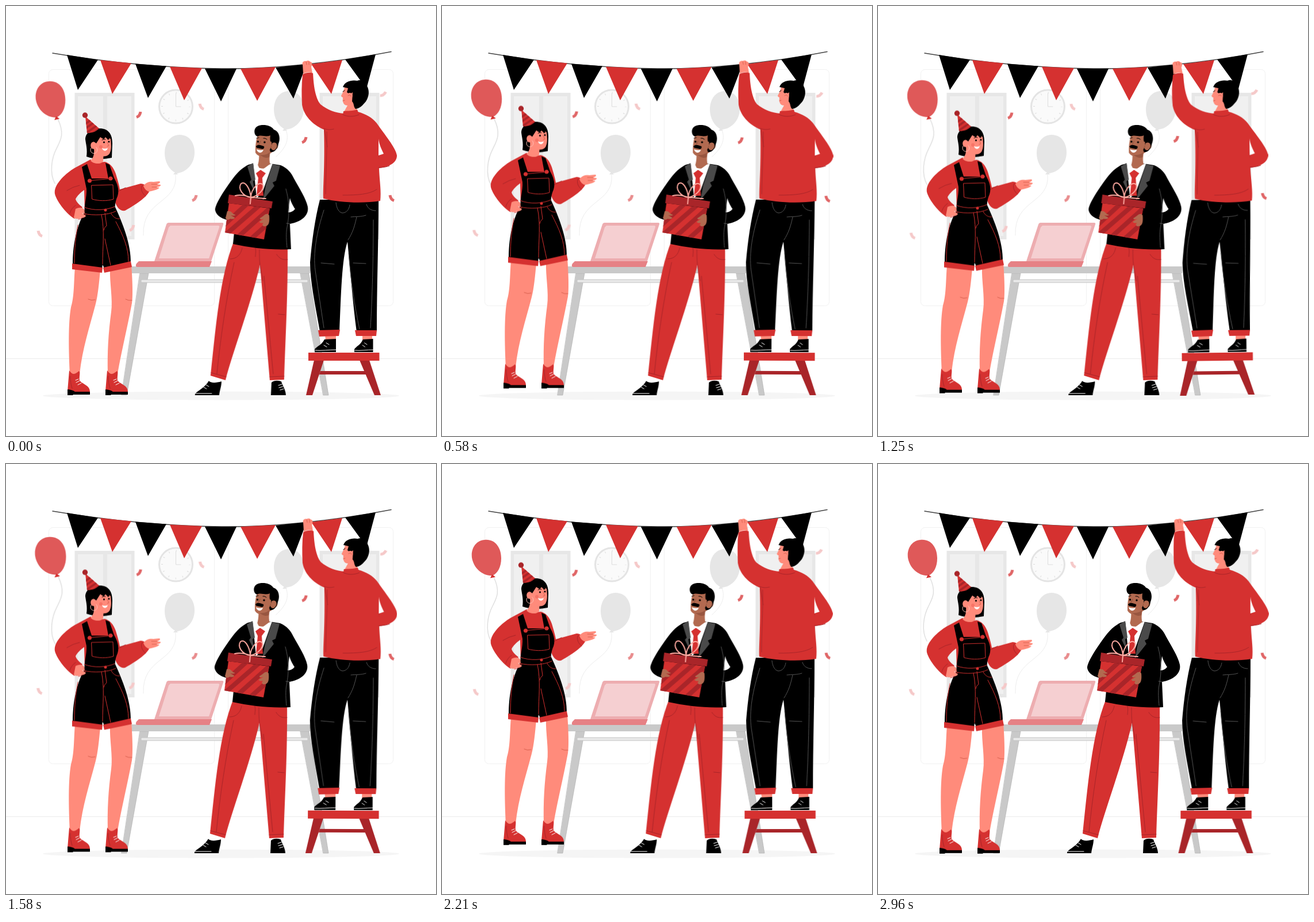
Write an HTML page that moves like this. It is 748 by 748 pixels and loops after 3 s.

```html
<!DOCTYPE html>
<html lang="en">
<head>
<meta charset="utf-8">
<title>Party preparations</title>
<style>
html, body { margin: 0; width: 100%; height: 100%; overflow: hidden; background: #fff; }
svg { display: block; width: 100%; height: 100%; }

.r { fill: #d53130; } .d { fill: #a92529; } .k { fill: #000; }
.s { fill: #ff8b7b; } .b { fill: #b26a50; } .w { fill: #fff; }
.g { fill: #c9c9c9; } .e { fill: #e6e6e6; } .p { fill: #f0f0f0; }
.l { fill: none; stroke-width: 1; stroke-linecap: round; stroke-linejoin: round; }
.lr { stroke: #d53130; } .ld { stroke: #a92529; } .lk { stroke: #000; }
.lg { stroke: #555; } .lw { stroke: #fff; } .le { stroke: #e6e6e6; }
.ls { stroke: #d9604f; }

/* every part runs 40 ms ahead of the clock */
#woman, #host, #climber, #confetti, #balloon { animation: 1.5s linear -40ms infinite; }
#woman { animation-name: float; }
#host { animation-name: shake; animation-duration: 3s; }
#climber { animation-name: sway; transform-origin: 598px 386px; }
#confetti { animation-name: sway; transform-origin: 364px 276px; }
#balloon { animation-name: beat; animation-duration: 3s; transform-origin: 77px 220px; }

@keyframes float {
  0%, 100% { transform: translateY(.8px); }
  50% { transform: translateY(-14.2px); }
}
@keyframes sway {
  0%, 100% { transform: rotate(-.1deg); }
  25% { transform: rotate(.9deg); }
  75% { transform: rotate(-1.1deg); }
}
@keyframes shake {
  0%, 100% { transform: translateX(0); }
  10%, 90% { transform: translateX(-1.5px); }
  20%, 80% { transform: translateX(3px); }
  30%, 50%, 70% { transform: translateX(-6px); }
  40%, 60% { transform: translateX(6px); }
}
@keyframes beat {
  0%, 28%, 40%, 62%, 100% { transform: scale(1); }
  13%, 49% { transform: scale(1.09); }
}
</style>
</head>
<body>
<svg viewBox="0 0 748 748">
  <defs>
    <g id="window">
      <path class="e" fill-opacity=".95" d="M119.500 151H223.500V406H119.500Z"/>
      <path class="p" d="M125 157H169V400H125ZM176 157H218V400H176Z"/>
    </g>
    <path id="bit" class="l" d="M-4 4.500Q2 2.500 3 -5" style="stroke-width:5;stroke-linecap:butt"/>
    <g id="grey">
      <path class="e" d="M302 224C319 224 328 238 328 255C328 274 314 290 296 291C283 285 276 270 276 256C276 238 286 224 302 224Z"/>
      <path class="e" d="M295 288L291 293H299Z"/>
    </g>
    <g id="boot">
      <path class="r" d="M110 634C113 638 115 640 118 640C121 640 124 637 127 635C130 637 127 645 128 651C132 658 146 659 146 671L145 674H118L107 670Z"/>
      <path class="k" d="M107 667C111 667 116 668 120 671L146 671V676H117L116 677H107Z"/>
      <path class="l lw" d="M121 651L126 649M122 655L128 652M125 659L131 656"/>
      <path class="l ld" d="M112 644C112 652 113 660 115 665"/>
    </g>
    <g id="sneaker">
      <path class="k" d="M554 580L574 579V602H537V597C542 591 549 590 554 580Z"/>
      <path class="l lw" d="M538 599C548 600 562 598 574 598M553 590L558 593M557 586L562 589"/>
    </g>
    <clipPath id="cone"><path d="M138 192L162 213C156 219 149 221 141 221Z"/></clipPath>
    <clipPath id="box"><path d="M388 343L459 352L449 406L381 394Z"/></clipPath>
  </defs>

  <!-- room -->
  <g class="l" stroke="#f1f1f1">
    <rect x="74.500" y="110.500" width="288" height="411" rx="7"/>
    <rect x="386.500" y="110.500" width="287" height="411" rx="7"/>
    <path d="M0 613.500H748" stroke="#ebebeb"/>
  </g>
  <ellipse cx="374" cy="678" rx="310" ry="7.500" fill="#f5f5f5"/>
  <use href="#window"/><use href="#window" x="426"/>
  <circle cx="295.500" cy="175" r="29" fill="#fafafa" stroke="#e4e4e4" stroke-width="3"/>
  <circle class="l" cx="295.500" cy="175" r="24" stroke="#ddd" style="stroke-width:3;stroke-linecap:butt" stroke-dasharray="1 11.566" stroke-dashoffset=".5"/>
  <path class="l" stroke="#ddd" d="M295.500 152V175H304"/>
  <use href="#grey"/><use href="#grey" x="190" y="-76"/>
  <path class="l" stroke="#ededed" d="M295 293C300 345 236 335 239 399M487 216C494 234 485 248 470 262"/>

  <g id="balloon">
    <path class="l" stroke="#dfdfdf" style="stroke-width:1.500" d="M90 197C102 222 95 233 88 247C79 264 75 290 85 308"/>
    <path fill="#df5959" d="M74 132C92 130 103 145 103 164C103 179 97 190 88 194C70 195 55 181 52 163C50 147 59 133 74 132Z"/>
    <path class="r" d="M87 192L84 198.500L93 196.500Z"/>
  </g>

  <!-- table and laptop -->
  <path class="l" stroke="#aaa" fill="#c9c9c9" style="fill:#c9c9c9;stroke-width:.6" d="M233 465H248L210 677H201ZM512 465H527L561 677H552Z"/>
  <path stroke="#c2c2c2" fill="#e9e9e9" d="M235 476H525V481H235Z"/>
  <path class="g" d="M214 453H529V465H214Z"/>
  <path fill="#edadb0" d="M283 377H376Q379 377 378 380L357 444H258L279 380Q280 377 283 377Z"/>
  <path fill="#f5cfd1" d="M286 382H369Q372 382 371 385L353 439H266L283 385Z"/>
  <path fill="#e68185" d="M231 444H358L354 454H228Q224 453 227 448Z"/>

  <g id="confetti">
    <g stroke="#e06667">
      <use href="#bit" x="231" y="189"/><use href="#bit" x="519" y="233"/>
      <use href="#bit" transform="translate(671 334)scale(-1 1)"/>
    </g>
    <use href="#bit" x="328" y="334" stroke="#e98d8e"/>
    <g stroke="#f5c9c9">
      <use href="#bit" x="219" y="386"/><use href="#bit" transform="translate(656 153)rotate(20)"/>
      <use href="#bit" transform="translate(340 175)scale(-1 1)"/>
      <use href="#bit" transform="translate(59 396)scale(-1 1)"/>
    </g>
  </g>

  <!-- bunting -->
  <path class="l" stroke="#444" style="stroke-width:1.500" d="M81 82C200 102 300 108 375 109S560 101 670 79.500"/>
  <path class="k" d="M106 85L160 93.500L125 146ZM225 100.500L279 104.500L247 160ZM346 109H401L374 166ZM469 107L523 101L500 161ZM590 93L643 84L627 144Z"/>
  <path class="r" d="M164 94L218 99.500L185 153ZM285 105.500L341 108L310 164ZM408 109L469 106L437 165ZM531 101L585 94L566 153Z"/>

  <g id="host">
    <!-- shoes, trousers -->
    <path class="k" d="M353 652C356 656 365 656 375 653C375 662 372 668 371 677H329C328 671 344 667 353 652ZM462 655C466 651 473 651 479 653C481 660 487 668 487 677H461Z"/>
    <path class="l lw" d="M344 663L349 666M348 659L353 662M330 674H358M474 660L480 658M475 664L482 662M477 668L483 666"/>
    <path class="r" d="M397 408L490 415C491 500 486 580 484 650L459 651L442 450C426 520 395 600 382 651L356 643C365 560 372 470 397 408Z"/>
    <path class="l ld" d="M357 638L383 645M459 645L484 644M441 424C441 432 441 442 442 450L447 478M433 418C436 425 434 432 434 436M390 440C402 440 409 432 411 421M397 446C383 510 373 580 367 640M449 470L465 640M474 536L485 537M471 432C476 440 482 442 490 441"/>
    <!-- jacket and shirt -->
    <path class="k" d="M422 276L434 273L460 274L478 277C490 282 497 291 501 300C511 318 522 335 525 349C528 365 512 376 494 379L496 423C462 425 428 421 395 414L399 375C390 373 367 371 364 355C363 345 384 314 398 296C406 286 414 280 422 276Z"/>
    <path class="w" d="M494 334C496 342 501 350 503 353C500 357 496 359 491 359Z"/>
    <path class="w" d="M430 273L439 271L456 275L464 274L446 325L436 334Z"/>
    <path class="b" d="M440 254L461 250C458 262 458 270 460 276C455 283 446 285 437 280C440 273 441 263 440 254Z"/>
    <path class="w" d="M430 273L438 276L443 287L436 298ZM463 274L458 276L443 287L451 299Z"/>
    <path class="r" d="M443 285L452 291L446 299L448 330H436L439 299L435 291Z"/>
    <path fill="#4a4a4a" d="M420 279L430 273L434 302L430 305L433 325L424 306L427 302ZM464 275L477 278L470 304L464 307L467 313L447 338L452 312Z"/>
    <path class="l lg" d="M487 318C493 340 494 360 489 385C487 395 488 410 489 420M494 379L488 378"/>
    <!-- head -->
    <path class="b" d="M438 225C434 236 434 247 434 255C438 262 447 264 456 259C464 254 466 252 467 250C476 249 475 238 468 237L465 222Z"/>
    <path d="M441 258C447 261 456 258 459 254L458 263C452 266 446 262 441 258Z" fill="#985640"/>
    <path class="k" d="M438 227C431 225 430 213 438 209C446 205 461 207 466 215C476 218 478 230 474 240C473 246 468 256 460 254L459 250C461 246 463 243 462 236C460 237 459 234 460 225C452 229 444 223 438 227Z"/>
    <path class="b" d="M463 239C470 234 475 243 469 249C466 253 461 250 461 246Z"/>
    <path class="k" d="M435 244C439 240 443 242 449 244C450 248 447 250 443 248C439 247 436 248 435 244Z"/>
    <path class="w" d="M436 249C440 251 444 251 448 250C446 257 438 257 436 249Z"/>
    <circle class="k" cx="438.500" cy="236" r="1.700"/><circle class="k" cx="450" cy="237" r="1.700"/>
    <path class="l lk" d="M436 230L440 229M448 230Q451 229 454 232"/>
    <path class="l" stroke="#8b4d3a" d="M443 235L440 241"/>
    <!-- gift -->
    <path class="r" d="M388 343L459 352L449 406L381 394Z"/>
    <path class="l ld" clip-path="url(#box)" style="stroke-width:8" d="M374 386L425 339M383 397L443 345M399 406L458 353M421 410L466 370"/>
    <path class="d" d="M388 328L464 340L462 352L386 343Z"/>
    <g class="l" stroke="#ffaaa1" style="stroke-width:2">
      <path d="M426 333C412 331 403 318 409 309C416 303 425 318 426 333ZM426 333C427 318 440 303 447 311C450 320 438 331 426 333ZM426 333L425 344M399 330C410 327 420 331 426 333C437 333 445 335 452 335"/>
    </g>
    <path class="b" d="M385 357C393 355 393 362 399 363C400 365 395 365 391 364L398 368C398 371 393 371 390 370C388 372 384 373 382 369ZM458 364C452 358 449 366 442 369C441 372 447 371 449 370L441 375C441 378 446 378 448 377C444 382 448 384 452 383C458 382 459 374 458 364Z"/>
  </g>

  <g id="woman">
    <!-- legs, boots -->
    <path class="s" d="M120 455L164 460C162 480 160 503 156 518C145 560 133 595 128 640C123 646 115 645 111 640C109 600 108 552 113 524C119 506 118 476 120 455ZM181 458L218 450C220 475 221 506 219 517C211 560 202 595 194 640C190 646 181 645 177 640C176 602 178 570 183 532C186 510 180 480 181 458Z"/>
    <path class="l ls" d="M143 510Q149 513 155 511M208 510Q213 513 219 512"/>
    <use href="#boot"/><use href="#boot" x="66"/>
    <!-- shorts -->
    <path class="k" d="M137 358L190 350C202 376 218 414 217 448L171 456L168 450L167 457L116 450C116 420 121 386 137 358Z"/>
    <path class="r" d="M115 448L168 455L167 464L115 458ZM169 455L217 444L219 454L171 464Z"/>
    <path class="l lr" d="M166 363C172 390 168 420 168 449M172 360L175 382Q170 386 170 390M126 371C134 370 138 364 140 359M183 361C187 369 194 371 198 370M125 381C121 402 119 422 119 447M172 405L182 451M191 375C204 400 213 420 213 444"/>
    <!-- sweater -->
    <path class="r" d="M147 267C154 273 165 272 172 271C180 273 187 280 191 292C194 302 197 312 198 319L234 309C242 309 249 316 249 323C243 335 218 350 207 356C199 357 194 352 190 342L188 354L137 361L136 320C130 324 123 331 121 336C123 342 128 346 133 350L119 370C107 363 89 342 85 327C82 311 104 291 119 282Z"/>
    <path class="l ld" d="M121 347C116 350 112 356 111 361M237 312C233 318 237 326 243 331M106 321Q117 314 128 312M192 324L208 316"/>
    <path class="s" d="M121 353C127 350 132 350 135 353L141 359C142 362 136 361 132 360L139 365C138 368 133 369 131 368C126 371 121 371 118 368ZM239 313C244 306 251 305 256 306L266 305C270 305 268 309 262 310L269 311C270 314 263 315 261 315L267 316C264 320 255 321 249 323Q242 321 239 313Z"/>
    <path class="l ls" d="M253 310L263 310M254 315L262 315"/>
    <!-- overalls -->
    <path class="k" d="M132 280L141 275L149 300H178L173 273L180 276L188 299C193 308 198 319 194 331C190 340 189 348 190 358L137 362C135 348 141 332 140 318Z"/>
    <path class="l lr" d="M149 312L186 311L187 336C175 340 160 339 150 336ZM136 350C153 357 176 355 189 349M135 361C152 365 177 364 191 357M142 304L186 300"/>
    <path class="r" d="M142 304a3.500 3.500 0 1 0 7 0a3.500 3.500 0 1 0 -7 0M178.500 300a3.500 3.500 0 1 0 7 0a3.500 3.500 0 1 0 -7 0M170.500 355a2.500 2.500 0 1 0 5 0a2.500 2.500 0 1 0 -5 0"/>
    <!-- head -->
    <path class="k" d="M138 232C138 220 150 213 163 213C178 213 185 223 185 239L184 264C170 267 153 267 140 262C142 250 139 240 138 232Z"/>
    <path class="s" d="M153 247L170 255L169 270C164 277 151 274 147 269C152 264 154 258 153 247Z"/>
    <path class="s" d="M157 229C163 228 175 227 182 231C183 241 184 250 180 257C175 264 162 262 157 256C155 249 154 235 157 229Z"/>
    <path class="s" d="M157 238C151 233 145 239 148 246C150 250 155 249 157 247Z"/>
    <path class="k" d="M153 236C152 222 163 216 172 218C180 219 184 225 184 234L180 228L178 233L173 228L170 232L164 228L157 239Z"/>
    <path class="l" stroke="#ffc2b8" d="M148 247A6 6 0 1 0 157 246"/>
    <circle class="k" cx="170.500" cy="237" r="1.600"/><circle class="k" cx="179" cy="236" r="1.600"/>
    <path class="l lk" d="M167 233Q170 231 173 232M177 232L180 231"/>
    <path class="l ls" d="M176 237L179 243L176 244"/>
    <path class="w" d="M167 247C171 249 175 248 177 247C176 253 169 254 167 247Z"/>
    <circle cx="165" cy="245" r="3" fill="#f77467"/>
    <!-- hat -->
    <g clip-path="url(#cone)">
      <path class="r" d="M130 188H168V225H130Z"/>
      <path class="l ld" style="stroke-width:3.500" d="M134 208L152 195M134 216L158 199M138 222L164 204M148 224L166 211"/>
    </g>
    <circle class="d" cx="137.500" cy="190" r="4.700"/>
  </g>

  <g id="climber">
    <!-- stool -->
    <path class="d" d="M536 616H553L533 677H522ZM615 616H632L652 677H641ZM547 635H626V641H545Z"/>
    <path class="r" d="M526 603H649.500V617H526Z"/>
    <!-- feet, trousers -->
    <path class="s" d="M555 571H574V583H556ZM620 571H637V583H620Z"/>
    <use href="#sneaker"/><use href="#sneaker" x="606" transform="translate(606 0)scale(.88 1)translate(-1143 0)"/>
    <path class="k" d="M546 337H648C648 410 645 490 645 566L610 567C603 515 599 460 594 410C584 440 583 500 580 566H546C538 520 529 480 529 446C532 410 537 372 546 337Z"/>
    <path class="r" d="M543 564L581 563L579 574L545 575ZM607 564H645L644 574H609Z"/>
    <path class="l lg" d="M574 342C575 352 579 359 585 360C593 360 597 353 598 346M627 345C629 352 635 356 643 356M626 364C617 367 609 366 600 367M610 367C606 385 603 394 595 407M553 355C540 395 534 430 538 460L553 560M548 447L571 449M604 447L626 448M596 430C600 480 606 520 615 562M639 372C639 440 637 510 634 560"/>
    <!-- sweater -->
    <path class="d" d="M646 259L656 258L655 281L646 282Z"/>
    <path class="r" d="M516 119C522 115 531 115 534 117C535 138 538 160 547 171C559 181 574 186 588 187L612 184C626 188 637 194 645 204C658 223 678 246 680 260C680 272 668 280 648 282C647 279 648 276 649 260L655 257L648 243L649 286C650 305 653 323 651 339C620 344 580 342 552 335C551 315 555 280 553 215C532 206 518 190 515 172C514 154 514 136 516 119Z"/>
    <path class="w" d="M648 231C649 241 654 251 657 257L648 260Z"/>
    <path class="l ld" d="M553 213C560 216 565 215 570 214M554 215L559 245M586 329C610 329 632 328 645 319M648 281Q660 281 667 278M558 219C559 250 556 290 556 327"/>
    <path class="s" d="M517 118L516 103C514 97 519 95 522 96C525 94 528 95 529 97C533 97 533 102 531 106L533 117C528 114 521 115 517 118Z"/>
    <path class="l ls" d="M522 97L523 102M527 97L527 102"/>
    <!-- head -->
    <path class="s" d="M590 138C588 145 586 151 583 156C583 158 585 159 586 159C585 167 587 173 594 173L588 184C595 188 606 186 610 182L609 160L604 138Z"/>
    <path class="k" d="M586 141C589 131 602 128 611 130C618 127 627 132 628 139C633 148 631 158 626 166C620 173 616 178 608 179C604 175 606 170 602 166L603 150L598 154L593 150L595 143Z"/>
    <path class="s" d="M593 161C591 154 596 149 601 152C604 155 602 163 598 165Z"/>
    <path class="l ls" d="M595 156Q599 153 600 157M586 165L589 164"/>
    <path class="l lk" d="M586 149L589 147"/>
    <path class="r" d="M587 183C594 182 604 183 611 180L614 189C604 192 594 193 586 189Z"/>
    <path class="l ld" d="M586 189C594 193 605 193 614 189"/>
  </g>
</svg>
</body>
</html>
```
